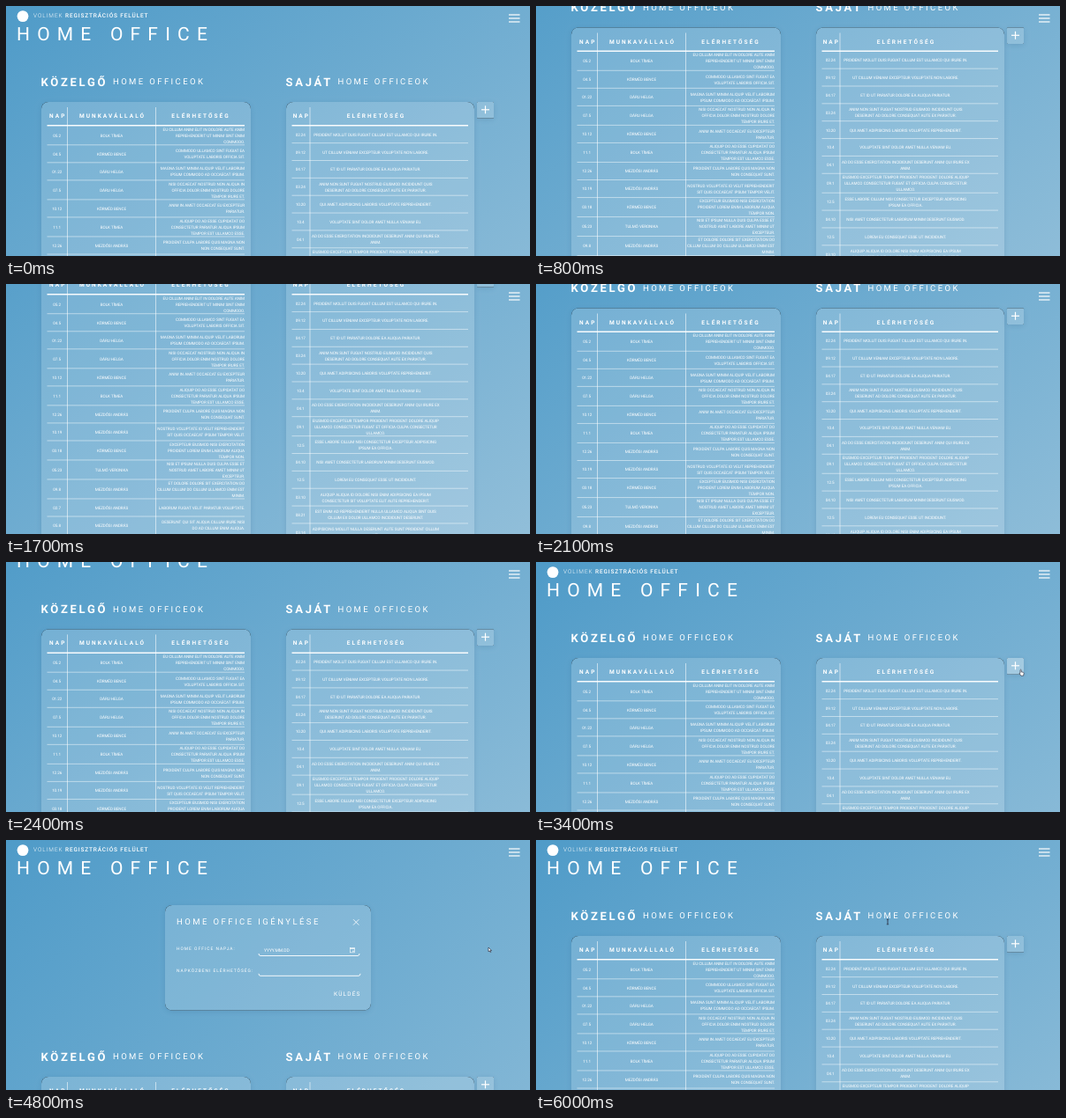
These frames come from a looping animation (593 px wide and 284 px high, 6400 ms). An HTML page with a canvas:

```html
<!DOCTYPE html>
<html lang="hu">
<head>
<meta charset="utf-8">
<title>Home office</title>
<style>
  html, body { margin: 0; width: 100%; height: 100%; overflow: hidden; background: #6aabd1; }
  canvas { display: block; width: 593px; height: 284px; }
</style>
</head>
<body>
<canvas id="stage"></canvas>
<script>
const W = 593, H = 284, LOOP = 6400, STEP = 100;
const PAGE_HEIGHT = 449, FORM_SPACE = 160;
const canvas = document.getElementById('stage');
const ctx = canvas.getContext('2d');
const ratio = window.devicePixelRatio || 1;
canvas.width = W * ratio;
canvas.height = H * ratio;

const [TIMEA, BENCE, HELGA, ANDRAS, VERONIKA] =
  ['BOLK TÍMEA', 'KÖRMÉD BENCE', 'DÁRU HELGA', 'MEZDŐSI ANDRÁS', 'TULMÓ VERONIKA'];

const upcoming = [
  ['05.2', 'EU CILLUM ANIM ELIT IN DOLORE AUTE ANIM|REPREHENDERIT UT MINIM SINT ENIM|COMMODO.', TIMEA],
  ['04.5', 'COMMODO ULLAMCO SINT FUGIAT EA|VOLUPTATE LABORIS OFFICIA SIT.', BENCE],
  ['01.22', 'MAGNA SUNT MINIM ALIQUIP VELIT LABORUM|IPSUM COMMODO AD OCCAECAT IPSUM.', HELGA],
  ['07.5', 'NISI OCCAECAT NOSTRUD NON ALIQUA IN|OFFICIA DOLOR ENIM NOSTRUD DOLORE|TEMPOR IRURE ET.', HELGA],
  ['10.12', 'ANIM IN AMET OCCAECAT EU EXCEPTEUR|PARIATUR.', BENCE],
  ['11.1', 'ALIQUIP DO AD ESSE CUPIDATAT DO|CONSECTETUR PARIATUR ALIQUA IPSUM|TEMPOR EST ULLAMCO ESSE.', TIMEA],
  ['12.26', 'PROIDENT CULPA LABORE QUIS MAGNA NON|NON CONSEQUAT SUNT.', ANDRAS],
  ['10.19', 'NOSTRUD VOLUPTATE ID VELIT REPREHENDERIT|SIT QUIS OCCAECAT IPSUM TEMPOR VELIT.', ANDRAS],
  ['03.18', 'EXCEPTEUR EIUSMOD NISI EXERCITATION|PROIDENT LOREM ENIM LABORUM ALIQUA|TEMPOR NON.', BENCE],
  ['05.23', 'NISI ET IPSUM NULLA DUIS CULPA ESSE ET|NOSTRUD AMET LABORE AMET MINIM UT|EXCEPTEUR.', VERONIKA],
  ['09.8', 'ET DOLORE DOLORE SIT EXERCITATION DO|CILLUM CILLUM DO CILLUM ULLAMCO ENIM EST|MINIM.', ANDRAS],
  ['02.7', 'LABORUM FUGIAT VELIT PARIATUR VOLUPTATE.', ANDRAS],
  ['05.8', 'DESERUNT QUI SIT ALIQUA CILLUM IRURE NISI|DO AD CILLUM ENIM ALIQUA.', ANDRAS]
];
const own = [
  ['02.24', 'PROIDENT MOLLIT DUIS FUGIAT CILLUM EST ULLAMCO QUI IRURE IN.'],
  ['09.12', 'UT CILLUM VENIAM EXCEPTEUR VOLUPTATE NON LABORE.'],
  ['04.17', 'ET ID UT PARIATUR DOLORE EA ALIQUA PARIATUR.'],
  ['03.24', 'ANIM NON SUNT FUGIAT NOSTRUD EIUSMOD INCIDIDUNT QUIS|DESERUNT AD DOLORE CONSEQUAT AUTE EX PARIATUR.'],
  ['10.20', 'QUI AMET ADIPISICING LABORIS VOLUPTATE REPREHENDERIT.'],
  ['10.4', 'VOLUPTATE SINT DOLOR AMET NULLA VENIAM EU.'],
  ['04.1', 'AD DO ESSE EXERCITATION INCIDIDUNT DESERUNT ANIM QUI IRURE EX|ANIM.'],
  ['09.1', 'EIUSMOD EXCEPTEUR TEMPOR PROIDENT PROIDENT DOLORE ALIQUIP|ULLAMCO CONSECTETUR FUGIAT ET OFFICIA CULPA CONSECTETUR|ULLAMCO.'],
  ['12.5', 'ESSE LABORE CILLUM NISI CONSECTETUR EXCEPTEUR ADIPISICING|IPSUM EA OFFICIA.'],
  ['04.10', 'NISI AMET CONSECTETUR LABORUM MINIM DESERUNT EIUSMOD.'],
  ['12.5', 'LOREM EU CONSEQUAT ESSE UT INCIDIDUNT.'],
  ['03.10', 'ALIQUIP ALIQUA ID DOLORE NISI ENIM ADIPISICING EA IPSUM|CONSECTETUR SIT VOLUPTATE ELIT AUTE REPREHENDERIT.'],
  ['08.21', 'EST ENIM AD REPREHENDERIT NULLA ULLAMCO ALIQUA SINT DUIS|CILLUM EX DOLOR ULLAMCO INCIDIDUNT DESERUNT.'],
  ['03.14', 'ADIPISICING MOLLIT NULLA DESERUNT AUTE SUNT PROIDENT CILLUM|UT.'],
  ['05.3', 'MAGNA NOSTRUD DO LABORIS SINT.']
];

// Each key is [time, value, ...]; values change linearly between keys.
const scrollKeys = [[200, 0], [800, 84.5], [1100, 165], [1200, 165], [1400, 156], [2100, 81.5], [2600, 0]];
const formKeys = [[3500, 0], [3600, 0.35], [3700, 0.7], [3800, 0.92], [3900, 1], [5800, 1], [5900, 0.45], [6000, 0]];
const cursorKeys = [[2600, 600, 282], [2900, 574, 192], [3000, 574, 192], [3400, 547, 122],
  [4700, 547, 122], [4800, 546, 122], [4900, 417, 106], [5000, 417, 106], [5400, 396, 91], [5800, 396, 91], [6000, 398, 93]];

function track(keys, t, channel = 1) {
  if (t <= keys[0][0]) return keys[0][channel];
  for (let i = 1; i < keys.length; i++) {
    const a = keys[i - 1], b = keys[i];
    if (t <= b[0]) return a[channel] + (b[channel] - a[channel]) * (t - a[0]) / (b[0] - a[0]);
  }
  return keys[keys.length - 1][channel];
}

const white = alpha => `rgba(255,255,255,${alpha})`;

// y is the middle of the capitals.
function text(str, x, y, size, { spacing = 0, words = 0, weight = 400, align = 'left' } = {}) {
  ctx.font = `${weight} ${size}px Roboto, Arial, sans-serif`;
  ctx.textRendering = 'geometricPrecision';
  ctx.letterSpacing = spacing + 'px';
  ctx.wordSpacing = words + 'px';
  ctx.textAlign = align;
  ctx.fillStyle = '#fff';
  ctx.fillText(str, x + (align === 'center' ? spacing / 2 : 0), y + size * 0.356);
}

function line(x1, y1, x2, y2, width = 1, color = '#fff') {
  ctx.beginPath();
  ctx.moveTo(x1, y1);
  ctx.lineTo(x2, y2);
  ctx.lineWidth = width;
  ctx.strokeStyle = color;
  ctx.stroke();
}

// The shadow is kept outside the box so that the glass stays flat.
function panel(x, y, w, h, radius = 8, alpha = 0.165) {
  const box = new Path2D();
  box.roundRect(x, y, w, h, radius);
  const outside = new Path2D(box);
  outside.rect(x - 20, y - 20, w + 40, h + 40);
  ctx.save();
  ctx.clip(outside, 'evenodd');
  ctx.shadowColor = 'rgba(30,70,110,.16)';
  ctx.shadowBlur = 6 * ratio;
  ctx.shadowOffsetY = 1.5 * ratio;
  ctx.fillStyle = '#000';
  ctx.fill(box);
  ctx.restore();
  ctx.fillStyle = white(alpha);
  ctx.fill(box);
}

function background(scroll, pageHeight) {
  const k = 2 / (1 / W ** 2 + 1 / pageHeight ** 2);
  const fill = ctx.createLinearGradient(0, -scroll, k / W, k / pageHeight - scroll);
  fill.addColorStop(0, '#4f9bc8');
  fill.addColorStop(1, '#94c0da');
  ctx.fillStyle = fill;
  ctx.fillRect(0, 0, W, H);
}

function pageHeader() {
  ctx.fillStyle = '#fff';
  ctx.beginPath();
  ctx.arc(19, 11.6, 6.4, 0, Math.PI * 2);
  ctx.fill();
  text('VOLIMEK', 31, 11, 6.5, { spacing: 0.95, weight: 300 });
  text('REGISZTRÁCIÓS FELÜLET', 67, 11, 6.5, { spacing: 0.86, weight: 500 });
  text('HOME OFFICE', 12, 31.5, 21, { spacing: 8.2 });
}

function menuIcon() {
  for (const y of [10, 14, 18]) line(569, y, 581.5, y, 1.2);
}

function sectionTitle(bold, x, lightX) {
  text(bold, x, 86, 13, { spacing: 2.75, weight: 700 });
  text('HOME OFFICEOK', lightX, 86, 9.5, { spacing: 2.4 });
}

function table(rows, t) {
  const head = { spacing: 2.05, weight: 700, align: 'center' };
  const small = { spacing: -0.1, words: 0.25 };
  const centered = { ...small, align: 'center' };
  panel(t.x, 109, t.width, t.height);
  for (const [label, x] of t.heads) text(label, x, 124.7, 6.5, head);
  let y = 135.8;
  line(t.left, y, t.right, y, 1.4, white(0.95));
  rows.forEach(([date, note, person], i) => {
    const lines = note.split('|');
    const height = lines.length > 2 ? 22 : t.rowHeight;
    const middle = y + height / 2 + 0.3;
    text(date, t.heads[0][1], middle, 4.6, centered);
    if (person) text(person, t.heads[1][1], middle, 4.6, centered);
    lines.forEach((str, n) =>
      text(str, t.noteX, middle + (n - (lines.length - 1) / 2) * 7, 4.6, { ...small, align: t.noteAlign }));
    y += height;
    if (i < rows.length - 1) line(t.left, y, t.right, y, 0.8, white(0.6));
  });
  for (const x of t.dividers) line(x, 115, x, y, 0.8, white(0.7));
}

function addButton(hover) {
  panel(533, 109, 19, 18.5, 1, hover ? 0.32 : 0.18);
  line(538, 117.8, 547, 117.8, 1.2);
  line(542.5, 113.3, 542.5, 122.3, 1.2);
}

function inputLine(x1, x2, y) {
  ctx.beginPath();
  ctx.moveTo(x1, y - 2.5);
  ctx.quadraticCurveTo(x1, y, x1 + 2, y);
  ctx.lineTo(x2 - 2, y);
  ctx.quadraticCurveTo(x2, y, x2, y - 2.5);
  ctx.lineWidth = 0.9;
  ctx.strokeStyle = '#fff';
  ctx.stroke();
}

function requestForm(open) {
  ctx.save();
  ctx.globalAlpha = open;
  panel(180, 74, 233, 119.5);
  text('HOME OFFICE IGÉNYLÉSE', 193, 92.5, 9.5, { spacing: 2.45 });
  line(393, 90.2, 399.4, 96.6, 0.8);
  line(399.4, 90.2, 393, 96.6, 0.8);
  text('HOME OFFICE NAPJA:', 193, 123.3, 4.9, { spacing: 1 });
  text('NAPKÖZBENI ELÉRHETŐSÉG:', 193, 148.3, 4.9, { spacing: 0.96 });
  text('YYYY.MM.DD', 292, 125, 5, { spacing: -0.1 });
  inputLine(286, 400, 131.5);
  inputLine(286, 401, 154.3);
  ctx.lineWidth = 0.6;
  ctx.strokeRect(389.5, 122.6, 5, 5.2);
  line(389.5, 123.4, 394.5, 123.4, 0.9);
  ctx.fillStyle = '#fff';
  ctx.fillRect(392.3, 125.6, 1.3, 1.3);
  text('KÜLDÉS', 371, 174.5, 6.5, { spacing: 1.15 });
  ctx.restore();
}

const arrow = new Path2D('M0 0V4.8L1.2 3.8L2 5.5L2.8 5.2L2 3.5H3.5Z');
const hand = new Path2D('M1 .6Q1.6-.2 2.1.6V2.8L4.6 3.4Q5.3 3.7 5.1 4.6L4.6 7.2H1.9L.1 4.8Q-.2 4 1 4.3Z');

function cursor(t) {
  if (t < 2700) return;
  ctx.save();
  ctx.translate(track(cursorKeys, t, 1), track(cursorKeys, t, 2));
  if (t >= 6000) {
    line(0, -2.6, 0, 2.6, 0.8, '#223');
    line(-1.2, -2.8, 1.2, -2.8, 0.7, '#223');
    line(-1.2, 2.8, 1.2, 2.8, 0.7, '#223');
  } else {
    const pointing = (t >= 3300 && t < 3700) || (t >= 5400 && t < 5900);
    const shape = pointing ? hand : arrow;
    ctx.fillStyle = '#fff';
    ctx.strokeStyle = '#223';
    ctx.lineWidth = 0.6;
    ctx.fill(shape);
    ctx.stroke(shape);
  }
  ctx.restore();
}

const upcomingLayout = {
  x: 40, width: 237, height: 306, left: 46.5, right: 270, rowHeight: 20.05,
  heads: [['NAP', 57.7], ['MUNKAVÁLLALÓ', 119.5], ['ELÉRHETŐSÉG', 219.5]],
  dividers: [69.5, 169.5], noteX: 270, noteAlign: 'right'
};
const ownLayout = {
  x: 317, width: 213, height: 334, left: 323.5, right: 523, rowHeight: 19.85,
  heads: [['NAP', 333.3], ['ELÉRHETŐSÉG', 418]],
  dividers: [344], noteX: 418.3, noteAlign: 'center'
};

function draw(t) {
  const scroll = track(scrollKeys, t);
  const open = track(formKeys, t);
  ctx.setTransform(ratio, 0, 0, ratio, 0, 0);
  background(scroll, PAGE_HEIGHT + FORM_SPACE * open);
  ctx.save();
  ctx.translate(0, -scroll);
  pageHeader();
  if (open > 0) requestForm(open);
  ctx.translate(0, FORM_SPACE * open);
  sectionTitle('KÖZELGŐ', 39.5, 121);
  sectionTitle('SAJÁT', 316.5, 375.5);
  table(upcoming, upcomingLayout);
  table(own, ownLayout);
  addButton(t >= 3300 && t < 3700);
  ctx.restore();
  menuIcon();
  cursor(t);
}

const start = performance.now();
function tick() {
  const elapsed = (performance.now() - start) % LOOP;
  draw(Math.floor(elapsed / STEP) * STEP);
  requestAnimationFrame(tick);
}
tick();
</script>
</body>
</html>
```
